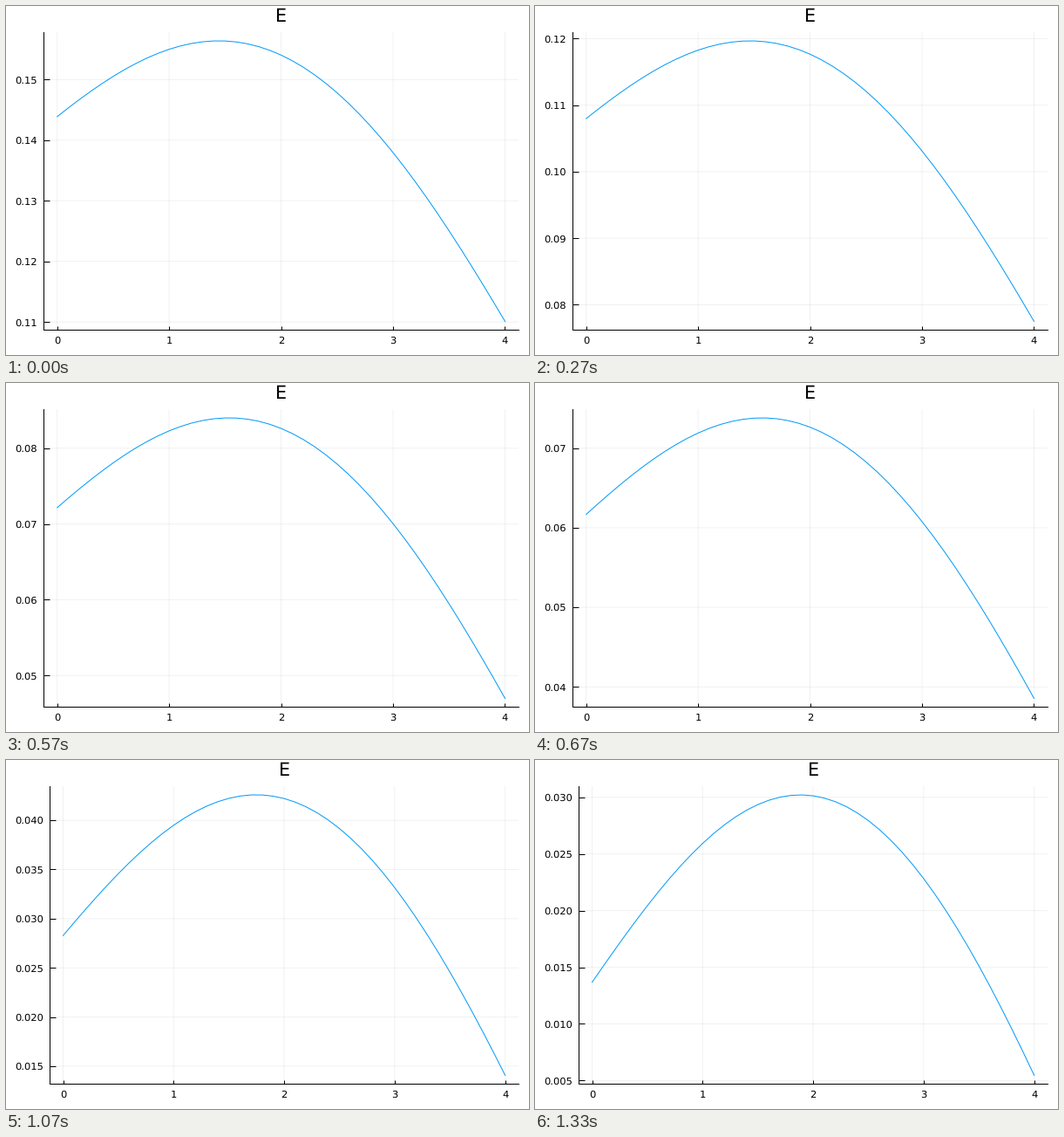
These frames come from a looping animation (600 px wide and 400 px high, 1.36 s). A matplotlib script:

```python
import numpy as np
import matplotlib.pyplot as plt
from matplotlib.animation import FuncAnimation

W, H, DPI = 600, 400, 100
PX = 72 / DPI                      # points per pixel
TICK_MS, LOOP_MS = 10, 1360
LAST = 40                          # index of the last simulation step
TOP, BOTTOM, RIGHT = 30.4, 371.1, 587.9
PAD = 0.03                         # margin around the data, relative to its span
WAVE = 0.665                       # wavenumber of the bulge

plt.rcParams["font.family"] = "DejaVu Sans"
plt.rcParams["text.hinting"] = "none"

xs = np.linspace(0, 4, 41)


def field(step):
    """A tilted line plus one long wave, both sinking over time."""
    p = step / LAST
    level = 0.11853 - 0.1754 * p + 0.0274 * p**2 + 0.0536 * p**3 - 0.021 * p**4
    tilt = -0.00815 + 0.0009 * p + 0.0058 * p**2 - 0.00245 * p**3
    even = 0.0355 - 0.0152 * p + 0.0067 * p**2
    odd = -0.0006 + 0.0044 * p
    u = xs - 2
    return level + tilt * u + even * np.cos(WAVE * u) + odd * np.sin(WAVE * u)


def ticks_between(lo, hi):
    """Steps of 0.01 if at least four fit, else 0.005."""
    for size, digits in ((0.01, 2), (0.005, 3)):
        ticks = size * np.arange(np.ceil(lo / size), np.floor(hi / size) + 1)
        if len(ticks) >= 4:
            break
    return ticks, digits


fig = plt.figure(figsize=(W / DPI, H / DPI), dpi=DPI, facecolor="white")
ax = fig.add_axes([0.1, 0.1, 0.8, 0.8])
ax.set_axisbelow(True)
ax.grid(color="black", alpha=0.055, linewidth=PX, snap=False)
ax.spines[["top", "right"]].set_visible(False)
ax.spines[["left", "bottom"]].set_linewidth(PX)
ax.tick_params(direction="in", width=PX, labelsize=11.5 * PX)
ax.tick_params(axis="x", length=4.1 * PX, pad=7.5 * PX)
ax.tick_params(axis="y", length=6.5 * PX, pad=7 * PX)
ax.set_xlim(-4 * PAD, 4 + 4 * PAD)
ax.set_xticks(range(5))
curve, = ax.plot(xs, field(0), color="#009AF9", linewidth=PX)
title = fig.text(0.5, 1 - 18 / H, "E", fontsize=20.8 * PX, ha="center", va="baseline")


def draw(tick):
    # steps run at 30 per second, rounded to the 10 ms clock
    ys = field((3 * tick + 1) // 10)
    margin = PAD * np.ptp(ys)
    lo, hi = ys.min() - margin, ys.max() + margin
    ticks, digits = ticks_between(lo, hi)
    left = 43.3 if digits == 2 else 50.3

    ax.set_position([left / W, 1 - BOTTOM / H, (RIGHT - left) / W, (BOTTOM - TOP) / H])
    ax.set_yticks(ticks, [f"{t:.{digits}f}" for t in ticks])
    ax.set_ylim(lo, hi)
    curve.set_ydata(ys)
    title.set_x((left + RIGHT) / 2 / W)
    return curve, title


anim = FuncAnimation(fig, draw, frames=LOOP_MS // TICK_MS, interval=TICK_MS,
                     repeat=True, repeat_delay=0, blit=False)
plt.show()
```
